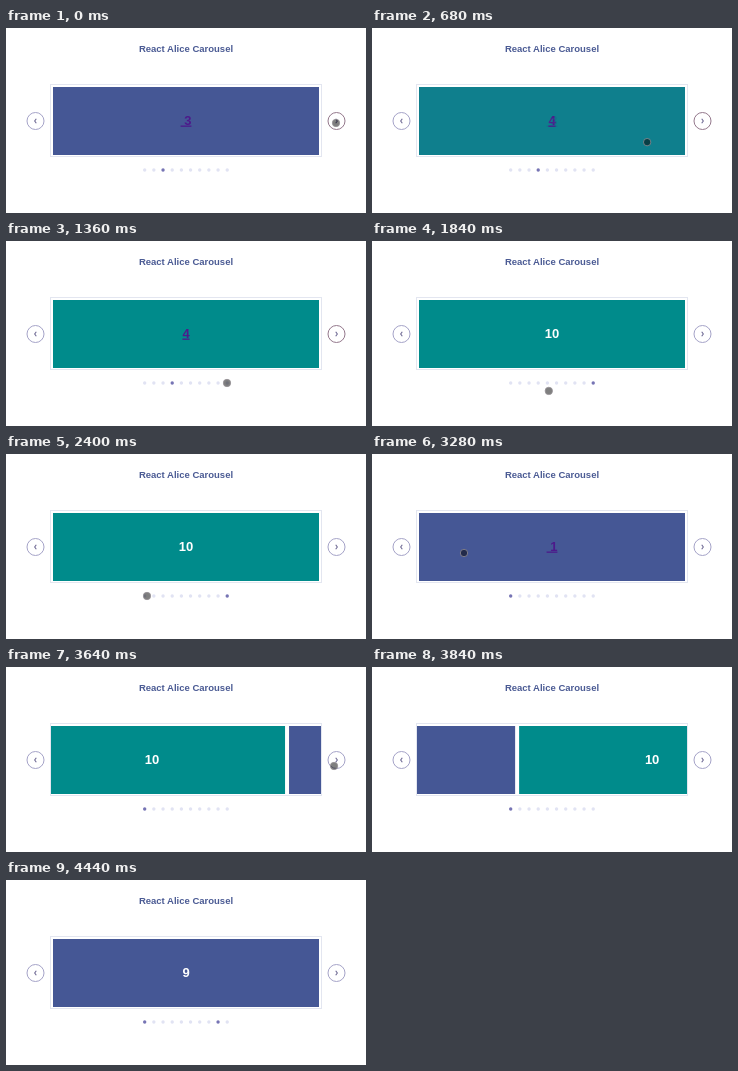
These frames come from a looping animation (360x185 px, 4.48 s). An HTML page:

```html
<!DOCTYPE html>
<html lang="en">
<head>
<meta charset="utf-8">
<title>Carousel</title>
<style>
  html, body { margin: 0; width: 100%; height: 100%; overflow: hidden; background: #fff; }
  svg { display: block; width: 360px; height: 185px; }
  text { font: bold 13px "Liberation Sans", Arial, sans-serif; text-anchor: middle; fill: #fff; }
  .title { font-size: 9.5px; fill: #4b5b94; }
  .link { fill: #4d1a8b; text-decoration: underline; }
  .button { fill: none; stroke: #a5a3c8; }
  .chevron { fill: none; stroke: #6f6a94; stroke-width: 1.1; }
</style>
</head>
<body>
<svg viewBox="0 0 360 185">
  <clipPath id="window"><rect x="45" y="57" width="270" height="72"/></clipPath>
  <text class="title" x="180" y="24">React Alice Carousel</text>
  <rect x="44.5" y="56.5" width="271" height="72" fill="#fff" stroke="#e3e6f0"/>
  <g id="slides" clip-path="url(#window)"></g>
  <circle class="button" cx="29.5" cy="93" r="8.5"/>
  <path class="chevron" d="M30.3 90.8l-1.6 2.2l1.6 2.2"/>
  <circle class="button" id="next" cx="330.5" cy="93" r="8.5"/>
  <path class="chevron" d="M329.7 90.8l1.6 2.2l-1.6 2.2"/>
  <g id="dots"></g>
  <circle id="cursor" r="3.7" fill="#000" fill-opacity=".5" stroke="#969096" stroke-opacity=".75"/>
</svg>
<script>
const LOOP = 4480, COUNT = 10, PITCH = 270;
const FADE = 400, RELEASE = 3690, SETTLE = 600;
const DRAG_START = 3360, DRAG_DISTANCE = 251;

const get = id => document.getElementById(id);
const add = (parent, name, attrs) => {
  const el = document.createElementNS("http://www.w3.org/2000/svg", name);
  for (const key in attrs) el.setAttribute(key, attrs[key]);
  return parent.appendChild(el);
};

const slides = [], dots = [];
for (let i = 0; i < COUNT; i++) {
  const n = i + 1, isLink = n < 9;
  const slide = add(get("slides"), "g", {});
  add(slide, "rect", { x: 47, y: 59, width: 266, height: 68, fill: n % 2 ? "#455795" : "#008b8b" });
  const label = add(slide, "text", { x: 180, y: 96.5, class: isLink ? "link" : "" });
  label.textContent = (isLink && n % 2 ? "\u00a0" : "") + n;
  slides.push(slide);
  dots.push(add(get("dots"), "circle", { cx: 138.7 + i * 9.17, cy: 142, r: 1.7 }));
}

const clamp = x => Math.min(1, Math.max(0, x));
const progress = (t, start, length) => clamp((t - start) / length);
const smooth = x => x * x * (3 - 2 * x);

// CSS "ease": cubic-bezier(.25, .1, .25, 1)
function ease(x) {
  const curve = (s, a, b) => 3 * (1 - s) ** 2 * s * a + 3 * (1 - s) * s * s * b + s ** 3;
  let low = 0, high = 1;
  for (let i = 0; i < 20; i++) {
    const mid = (low + high) / 2;
    if (curve(mid, .25, .25) < x) low = mid; else high = mid;
  }
  return curve(low, .1, 1);
}

const fades = [
  { at: 490, from: 3, to: 4 },
  { at: 1480, from: 4, to: 10 },
  { at: 2760, from: 10, to: 1 },
];

// Cursor moves: bend is the sideways bow of the path
const moves = [
  { at: 440, length: 480, from: [330, 95], to: [221, 142], bend: -4.5 },
  { at: 1520, length: 600, from: [221, 142], to: [141, 142], bend: 8 },
  { at: 2760, length: 500, from: [141, 142], to: [92, 99], bend: 0 },
  { at: DRAG_START, length: RELEASE - DRAG_START, from: [92, 99], to: [92 + DRAG_DISTANCE, 99], bend: 0 },
];

function place(n, x, opacity = 1) {
  const slide = slides[n - 1];
  slide.setAttribute("display", "inline");
  slide.setAttribute("transform", `translate(${x})`);
  slide.setAttribute("opacity", opacity);
  return slide;
}

function drawSlides(t) {
  slides.forEach(slide => slide.setAttribute("display", "none"));
  if (t >= DRAG_START) {
    const dragged = DRAG_DISTANCE * smooth(progress(t, DRAG_START, RELEASE - DRAG_START));
    const shift = dragged + (2 * PITCH - dragged) * ease(progress(t, RELEASE, SETTLE));
    [1, 10, 9].forEach((n, i) => place(n, shift - i * PITCH));
    return;
  }
  const fade = fades.findLast(f => t >= f.at) || fades[0];
  const shown = ease(progress(t, fade.at, FADE));
  place(fade.to, 0);
  if (shown < 1) get("slides").append(place(fade.from, 0, 1 - shown));
}

function drawDots(t) {
  const fade = fades.findLast(f => t >= f.at);
  const active = fade ? fade.to : 3;
  const settled = t >= RELEASE + SETTLE;
  dots.forEach((dot, i) => {
    const on = i + 1 === active || settled && i + 1 === 9;
    dot.setAttribute("fill", on ? "#7674b4" : "#e1e3f3");
  });
}

function drawCursor(t) {
  const move = moves.findLast(m => t >= m.at) || moves[0];
  const p = smooth(progress(t, move.at, move.length));
  const [x, y] = move.from.map((a, i) => a + (move.to[i] - a) * p);
  const cursor = get("cursor");
  cursor.setAttribute("cx", x);
  cursor.setAttribute("cy", y + move.bend * 4 * p * (1 - p));
  cursor.setAttribute("display", t < RELEASE + 50 ? "inline" : "none");
  get("next").style.stroke = t < 1400 ? "#94788c" : "";
}

function frame(now) {
  const t = now % LOOP;
  drawSlides(t);
  drawDots(t);
  drawCursor(t);
  requestAnimationFrame(frame);
}
frame(0);
</script>
</body>
</html>
```
